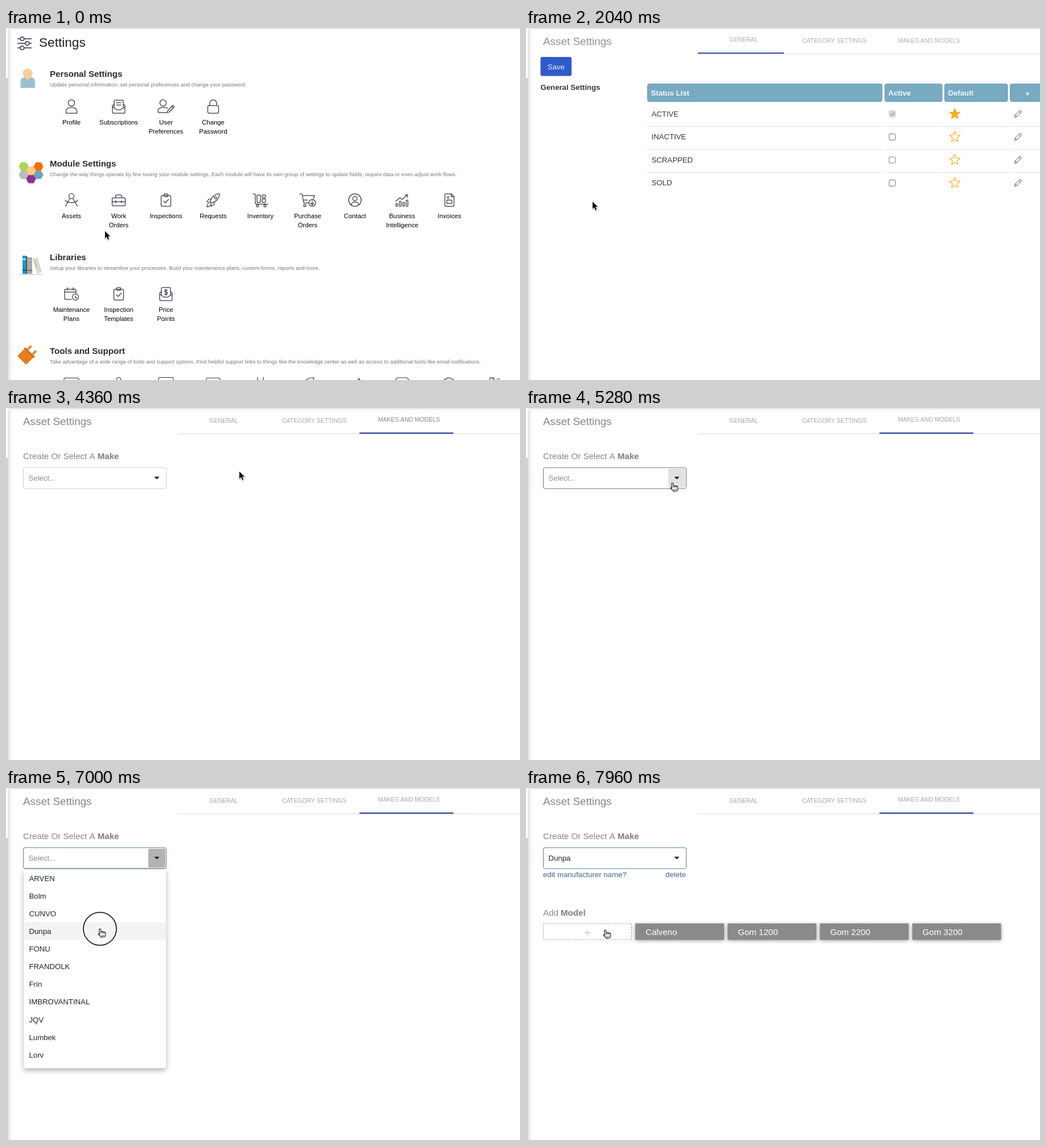
These frames come from a looping animation (903x620 px, 8000 ms). An HTML page with a canvas:

```html
<!DOCTYPE html>
<html lang="en">
<head>
<meta charset="utf-8">
<title>Asset settings</title>
<style>
html, body { margin: 0; width: 100%; height: 100%; overflow: hidden; background: #fff; }
canvas { display: block; }
</style>
</head>
<body>
<canvas id="stage" width="903" height="620"></canvas>
<script>
const W = 903, H = 620, LOOP = 8000, TICK = 40;
const ctx = document.getElementById('stage').getContext('2d');
const FONT = '"Liberation Sans", Arial, sans-serif';
const UNIT = 0.943; // page zoom
const clamp = v => Math.max(0, Math.min(1, v));

// ---------- helpers ----------
function text(s, x, y, size, color, { bold = false, align = 'left' } = {}) {
  ctx.font = `${bold ? 'bold ' : ''}${size * UNIT}px ${FONT}`;
  ctx.textAlign = align;
  ctx.fillStyle = color;
  ctx.fillText(s, x, y);
  return ctx.measureText(s).width;
}
function rect(x, y, w, h, color) {
  ctx.fillStyle = color;
  ctx.fillRect(x, y, w, h);
}
function round(x, y, w, h, r, fill, stroke) {
  ctx.beginPath();
  ctx.roundRect(x, y, w, h, r);
  if (fill) { ctx.fillStyle = fill; ctx.fill(); }
  if (stroke) { ctx.strokeStyle = stroke; ctx.lineWidth = 1; ctx.stroke(); }
}
function shape(points, color) {
  ctx.beginPath();
  points.forEach(([x, y]) => ctx.lineTo(x, y));
  ctx.closePath();
  ctx.fillStyle = color;
  ctx.fill();
}
function disc(x, y, r, color) {
  ctx.beginPath();
  ctx.arc(x, y, r, 0, Math.PI * 2);
  ctx.fillStyle = color;
  ctx.fill();
}
function at(x, y, draw, angle = 0) {
  ctx.save();
  ctx.translate(x, y);
  ctx.rotate(angle);
  draw();
  ctx.restore();
}
function shadowed(blur, color, dy, draw) {
  ctx.save();
  Object.assign(ctx, { shadowBlur: blur, shadowColor: color, shadowOffsetY: dy });
  draw();
  ctx.restore();
}

// ---------- line icons ----------
const dot = (x, y, r) => `M${x - r} ${y}a${r} ${r} 0 1 0 ${2 * r} 0a${r} ${r} 0 1 0 ${-2 * r} 0`;
const box = (x, y, w, h, r = 2) => `M${x + r} ${y}h${w - 2 * r}a${r} ${r} 0 0 1 ${r} ${r}v${h - 2 * r}` +
  `a${r} ${r} 0 0 1 ${-r} ${r}h${2 * r - w}a${r} ${r} 0 0 1 ${-r} ${-r}v${2 * r - h}a${r} ${r} 0 0 1 ${r} ${-r}`;
const envelope = 'M-8-4l-3 3v11a2 2 0 0 0 2 2h18a2 2 0 0 0 2-2v-11l-3-3M-11 1l8 5h6l8-5M-8 2v-11a2 2 0 0 1 2-2h12a2 2 0 0 1 2 2v11';
const icons = {
  sliders: 'M-12-8h4M0-8h12M-12 0h13M9 0h3M-12 8h4M0 8h12' + dot(-4, -8, 3.3) + dot(5, 0, 3.3) + dot(-4, 8, 3.3),
  profile: dot(0, -6, 5.6) + 'M-9.5 12v-3a7 7 0 0 1 7-7h5a7 7 0 0 1 7 7v3z',
  subscriptions: envelope + 'M-4-6.5h8M-4-2.5h8',
  preferences: dot(-5, -6, 5.6) + 'M1 11h-13q-2 0-2-2c0-5 3-7 7-7h5q3 0 4.5 1.3M3 8l8-9q2-1.5 3 .2t-.6 3l-7.4 7.8-4 1zM10 0l3 3',
  lock: box(-9.5, -1.5, 19, 13.5, 2.5) + 'M-6-1.5v-4a6 6 0 0 1 12 0v4',
  assets: dot(0, -7, 4.5) + 'M-2.5-3l-8 14M2.5-3l8 14M-11 0q2 4.5 11 4.5t11-4.5',
  work: box(-11.5, -4, 23, 14) + 'M-5.5-4v-3q0-2 2-2h7q2 0 2 2v3M-11.5 3h23M-5 1v4M5 1v4',
  clipboard: box(-8.5, -8, 17, 19) + box(-3.5, -11, 7, 5, 1.5) + 'M-4 2l3 3 5.5-6',
  rocket: 'M-5 4c1-8 7-15 16-15c0 9-7 15-15 16zM-3-2l-5 .5-3 5 5 .5M2 3l-.5 5-5 3-.5-5M-8 6q-3 1-3 6 5 0 6-3' + dot(4, -4, 2),
  trolley: 'M-13-11h2q2 0 2 2v14q0 2 2 2h20' + box(-6, -9, 6, 13, 1) + box(3, -9, 6, 5, 1) + box(3, -2, 6, 6, 1) + dot(-5, 10, 2) + dot(8, 10, 2),
  cart: 'M-14-11h3q1 0 1.4 2l2.6 14h8M-9.5-8h21.5l-2 6M-8 0h8M8 1.5v7m-3-3l3 3 3-3' + dot(-5, 9.5, 2) + dot(8, 5, 6),
  contact: dot(0, 0, 11) + dot(0, -2.5, 3.8) + 'M-6.5 8.5q1-5 5-5h3q4 0 5 5',
  chart: 'M-11 2l7-6 4 3 9-8M5-9h4.5v4.5' + box(-11, 6, 3, 5, 1) + box(-5, 2, 3, 9, 1) + box(1, 4, 3, 7, 1) + box(7, 0, 3, 11, 1),
  invoice: 'M-6-11h9l5 5v15q0 2-2 2h-12q-2 0-2-2v-18q0-2 2-2M3-11v5h5M-4.5-6h4M-4.5-3h4' + box(-4.5, 0, 9, 6, 1),
  calendar: 'M0 10h-10q-2 0-2-2v-14q0-2 2-2h16q2 0 2 2v6M-12-3h20M-7-11v5M3-11v5M7 4v3.5h3' + dot(7, 6, 5.5),
  price: envelope + 'M2.500-6q-2-1.5-4-.5t0 2.7 3.5 1.5-.2 3-4-.5M0-8v10',
  pencil: 'M-6 6l1-4 7-7q1.500-1.500 3 0t0 3l-7 7zM1-4l3 3M-5 2l3 3'
};
for (const key in icons) icons[key] = new Path2D(icons[key]);
function icon(name, x, y, width = 1.25) {
  at(x, y, () => {
    ctx.strokeStyle = '#30343f';
    ctx.lineWidth = width;
    ctx.lineJoin = ctx.lineCap = 'round';
    ctx.stroke(icons[name]);
  });
}

// ---------- coloured section pictures ----------
function drawPerson() {
  round(25.5, 87, 25.5, 18.5, [7, 7, 1, 1], '#9bbfd3');
  shape([[33, 87], [43, 87], [38, 92]], '#f0cd9b');
  disc(38, 80, 8.7, '#f6d09a');
}
function drawHexagons() {
  const cells = [[31, 244, '#a4d65e'], [57, 244, '#ff6b08'], [31, 258.5, '#b9bbbe'],
    [57, 258.5, '#6ba3bc'], [44, 266, '#8d3091'], [44, 251.5, '#ffcb80']];
  for (const [x, y, color] of cells) {
    shape(Array.from({ length: 6 }, (_, i) =>
      [x + 8.7 * Math.cos(i * Math.PI / 3), y + 8.7 * Math.sin(i * Math.PI / 3)]), color);
  }
}
function drawBooks() {
  rect(23, 433.5, 42, 1.5, '#cfd5d8');
  rect(29, 401, 6, 32, '#1c96cf');
  rect(29, 406, 6, 3, '#9bd8ee');
  rect(29, 425, 6, 3, '#15618c');
  rect(35, 402, 2.5, 31, '#47545f');
  rect(38, 404, 8, 29, '#a3a8ad');
  rect(38, 408, 8, 2, '#d9b48a');
  rect(38, 426, 8, 2, '#6c747c');
  at(47, 406, () => {
    rect(0, 0, 4, 28, '#ddd5c6');
    rect(4.5, 1, 4, 26, '#d3d4d2');
    rect(1, 4, 2, 14, '#e3b184');
  }, -0.28);
}
function drawPlug() {
  at(36, 577, () => {
    round(-11, -8, 22, 20, 2, '#e67e22');
    rect(-12, -9, 24, 3, '#cf6d1c');
    rect(-8, -18, 4, 9, '#e08a3c');
    rect(4, -18, 4, 9, '#e08a3c');
  }, Math.PI / 4);
}

// ---------- pages ----------
const sections = [
  ['Personal Settings', 'Update personal information, set personal preferences and change your password.', 86,
    [['profile', 'Profile'], ['subscriptions', 'Subscriptions'], ['preferences', 'User', 'Preferences'], ['lock', 'Change', 'Password']]],
  ['Module Settings', 'Change the way things operate by fine tuning your module settings. Each module will have its own group of settings to update fields, require data or even adjust work flows.', 244,
    [['assets', 'Assets'], ['work', 'Work', 'Orders'], ['clipboard', 'Inspections'], ['rocket', 'Requests'], ['trolley', 'Inventory'],
      ['cart', 'Purchase', 'Orders'], ['contact', 'Contact'], ['chart', 'Business', 'Intelligence'], ['invoice', 'Invoices']]],
  ['Libraries', 'Setup your libraries to streamline your processes. Build your maintenance plans, custom forms, reports and more.', 409,
    [['calendar', 'Maintenance', 'Plans'], ['clipboard', 'Inspection', 'Templates'], ['price', 'Price', 'Points']]],
  ['Tools and Support', 'Take advantage of a wide range of tools and support options. Find helpful support links to things like the knowledge center as well as access to additional tools like email notifications.', 574, []]
];
const cutIcons = new Path2D(box(102, 616.5, 26, 12) + dot(198, 619, 3.5) + box(268, 615.5, 26, 12) + box(352, 616.5, 24, 12) +
  'M442 615v6M452 615v6M527 620q5-4 14-4l-1 5M620 616v5M617.5 619h5M684 621q2-5 5-5h14q3 0 5 5M769 621q8-8 16-2l3 2M850 621v-5h9M853 616l7 5M862 618h6');

function drawShell() {
  rect(0, 0, W, H, '#fff');
  let g = ctx.createLinearGradient(0, 0, 0, 5);
  g.addColorStop(0, '#dededf');
  g.addColorStop(0.4, '#f3f3f3');
  g.addColorStop(1, '#fff');
  rect(4, 0, W, 5, g);
  g = ctx.createLinearGradient(3, 0, 13, 0);
  g.addColorStop(0, '#dfdfe0');
  g.addColorStop(0.4, '#f2f2f2');
  g.addColorStop(1, '#fff');
  rect(3, 3, 10, H, g);
  rect(0, 88, 4, H, '#d2d2d5');
}
function drawSettings() {
  icon('sliders', 32.5, 27, 1.5);
  text('Settings', 58, 33, 24, '#1d2026');
  drawPerson();
  drawHexagons();
  drawBooks();
  drawPlug();
  for (const [title, note, y, items] of sections) {
    const gap = y > 200 ? 7 : 0;
    text(title, 77, y, 16, '#252b35', { bold: true });
    text(note, 77, y + 17, 10, '#77777d');
    items.forEach(([name, ...lines], i) => {
      const x = 115 + 83 * i;
      icon(name, x, y + 52 + gap);
      lines.forEach((line, j) => text(line, x, y + 84 + gap + 16 * j, 12, '#000', { align: 'center' }));
    });
  }
  ctx.strokeStyle = '#30343f';
  ctx.lineWidth = 1.2;
  ctx.stroke(cutIcons);
}

const tabs = [['GENERAL', 382.3, 302, 151], ['CATEGORY SETTINGS', 541.6, 453, 168], ['MAKES AND MODELS', 708, 621, 165]];
function drawHeader(active, slide, focused) {
  text('Asset Settings', 30, 29.5, 20, '#858585');
  rect(302, 45, W - 302, 1, '#dcdcdc');
  tabs.forEach(([label, x], i) => {
    const on = i === active;
    text(label, x, on ? 24.3 : 25.5, 11.15, on && focused ? '#858585' : '#a6a6a6', { align: 'center' });
  });
  const [from, to] = [tabs[0], tabs[2]];
  const mix = k => from[k] + (to[k] - from[k]) * slide;
  rect(mix(2), 43, mix(3), 2.5, '#4354ad');
}

function star(x, y, filled) {
  ctx.beginPath();
  for (let i = 0; i < 10; i++) {
    const a = -Math.PI / 2 + i * Math.PI / 5, r = i % 2 ? 4.3 : 9.8;
    ctx.lineTo(x + r * Math.cos(a), y + 0.5 + r * Math.sin(a));
  }
  ctx.closePath();
  ctx.lineJoin = 'round';
  ctx.lineWidth = 1.2;
  ctx.strokeStyle = ctx.fillStyle = '#fca311';
  if (filled) ctx.fill();
  ctx.stroke();
}
function drawGeneral() {
  round(25.5, 51, 54.5, 33.5, 3, '#1b4ac4');
  text('Save', 52.7, 73, 14, '#fff', { align: 'center' });
  text('General Settings', 25.5, 108.5, 14, '#222', { bold: true });
  const columns = [[213, 413, 'Status List'], [630, 101.5, 'Active'], [735, 111.5, 'Default'], [850, 70, '']];
  for (const [x, w, label] of columns) {
    round(x + 0.5, 98.5, w - 1, 31, 3, '#6ba2bb', '#5d94ad');
    text(label, x + 6.5, 119, 14, '#fff', { bold: true });
    for (let i = 0; i < 3; i++) rect(x, 173 + 40.5 * i, w, 1, '#dcdcdc');
  }
  text('+', 881, 119.5, 14, '#fff', { bold: true, align: 'center' });
  ['ACTIVE', 'INACTIVE', 'SCRAPPED', 'SOLD'].forEach((label, i) => {
    const y = 151 + 40.5 * i;
    text(label, 220.5, y + 4.7, 14, '#212121');
    round(638, y - 5, 11, 11, 2, i ? '#fff' : '#d6d6d6', i ? '#666' : '#c4c4c4');
    if (!i) {
      ctx.strokeStyle = '#8e8e8e';
      ctx.lineWidth = 1.5;
      ctx.stroke(new Path2D('M640.5 151.5l2.5 2.5 4-5.5'));
    }
    star(753.3, y, !i);
    icon('pencil', 864.5, y, 0.9);
  });
}

const makes = ['ARVEN', 'Bolm', 'CUNVO', 'Dunpa', 'FONU', 'FRANDOLK', 'Frin', 'IMBROVANTINAL', 'JQV', 'Lumbek', 'Lorv'];
const models = ['Calveno', 'Gom 1200', 'Gom 2200', 'Gom 3200'];
const ROW = 31.1, LIST_TOP = 143;

function drawSelect({ value, focus, button }) {
  const w = text('Create Or Select A ', 30, 90, 16, '#858585');
  text('Make', 30 + w, 90, 16, '#7d7d7d', { bold: true });
  round(30.5, 105, 251, 37, 3, '#fff', focus ? '#527c9e' : '#d0d0d0');
  if (button) round(250, 107, 30, 33, 2, button);
  text(value || 'Select...', 39.5, 128, 14, value ? '#222' : '#8b8b8b');
  shape([[260.5, 121], [269.5, 121], [265, 125.7]], '#222');
}
function drawList(hover) {
  shadowed(10, 'rgba(0,0,0,.3)', 4, () => round(31, 142.5, 250, 351, [0, 0, 4, 4], '#fff'));
  rect(33, 141.5, 246, 1, '#527c9e');
  if (hover >= 0) rect(31.5, LIST_TOP + ROW * hover, 249, ROW, '#f3f3f3');
  makes.forEach((name, i) => text(name, 40.5, 163.7 + ROW * i, 14, '#222'));
}
function drawModels() {
  text('edit manufacturer name?', 30, 156.5, 14, '#3c6690');
  text('delete', 281, 156.5, 14, '#3c6690', { align: 'right' });
  const w = text('Add ', 30, 224.5, 16, '#858585');
  text('Model', 30 + w, 224.5, 16, '#7d7d7d', { bold: true });
  ctx.save();
  ctx.setLineDash([3, 2]);
  ctx.strokeStyle = '#a0a0a0';
  ctx.lineWidth = 1;
  ctx.strokeRect(30.5, 239, 155, 28);
  ctx.restore();
  rect(103, 254, 10, 1.2, '#bbb');
  rect(107.4, 249.5, 1.2, 10, '#bbb');
  models.forEach((name, i) => {
    const x = 192 + 162.2 * i;
    shadowed(7, 'rgba(0,0,0,.4)', 1, () => rect(x, 238.5, 156, 29, '#8a8a8a'));
    text(name, x + 18, 259, 16, '#fff');
  });
}

// ---------- pointer ----------
const ease = {
  in: u => u * u,
  out: u => 1 - (1 - u) ** 3,
  both: u => u * u * (3 - 2 * u),
  hold: () => 0
};
// time, x, y, easing towards the point
const route = [
  [0, 174, 358], [180, 174, 358, 'hold'], [440, 99, 299, 'both'], [600, 117, 306, 'both'],
  [2240, 117, 306, 'hold'], [2400, 747, 88, 'both'], [2480, 650, 80, 'both'],
  [2680, 650, 80, 'hold'], [3000, 724.5, 20, 'both'],
  [4080, 724.5, 20, 'hold'], [4360, 410, 112, 'in'], [4880, 257, 132, 'out'],
  [5760, 257, 132, 'hold'], [6600, 172, 234, 'both'], [6760, 165, 248, 'both'],
  [7880, 165, 248, 'hold'], [7960, 139, 250, 'both'], [LOOP, 139, 250, 'hold']
];
const arrow = new Path2D('M0 0v12.5l2.9-2.7 2.2 4.9 2.1-.9-2.1-4.8h4z');
const hand = new Path2D('M-1.5 9.5v-8a1.4 1.4 0 0 1 2.8 0v4.8a1.3 1.3 0 0 1 2.6.2a1.3 1.3 0 0 1 2.5.6a1.2 1.2 0 0 1 2.4.7v2.7q0 2.2-1.3 4.3h-6.8q-1-2-4.4-5.4a1.2 1.2 0 0 1 2.2-.9z');
const knuckles = new Path2D('M1.3 6v3M3.9 6.5v2.7M6.4 7v2.5M2 11v2.5M4 11v2.5M6 11v2.5');

function pointerAt(t) {
  const i = Math.max(1, route.findIndex(p => p[0] >= t));
  const [t0, x0, y0] = route[i - 1], [t1, x1, y1, kind] = route[i];
  const k = ease[kind](clamp((t - t0) / (t1 - t0)));
  return t === t1 ? [x1, y1] : [x0 + (x1 - x0) * k, y0 + (y1 - y0) * k];
}
function drawPointer(x, y, isHand) {
  at(x, y, () => {
    ctx.lineJoin = 'round';
    if (isHand) {
      ctx.rotate(-0.1);
      ctx.fillStyle = '#fff';
      ctx.strokeStyle = '#111';
      ctx.lineWidth = 1.1;
      ctx.fill(hand);
      ctx.stroke(hand);
      ctx.lineWidth = 0.7;
      ctx.stroke(knuckles);
    } else {
      shadowed(2, 'rgba(0,0,0,.35)', 1, () => {
        ctx.strokeStyle = '#fff';
        ctx.lineWidth = 1.8;
        ctx.stroke(arrow);
      });
      ctx.fillStyle = '#000';
      ctx.fill(arrow);
    }
  });
}
function drawClick(t, x, y) {
  for (const start of [1200, 3320, 5000, 7000]) {
    const u = (t - start) / 200;
    if (u < 0 || u >= 1) continue;
    ctx.beginPath();
    ctx.arc(x, y, 29 * (1 - u), 0, Math.PI * 2);
    ctx.strokeStyle = '#000';
    ctx.lineWidth = 1.5;
    ctx.stroke();
  }
}

// ---------- timeline ----------
const OPEN_PAGE = 1680, SWITCH_TAB = 3600, OPEN_LIST = 5320, PICK = 7240;

function draw(t) {
  const [x, y] = pointerAt(t);
  drawShell();
  if (t < OPEN_PAGE) {
    drawSettings();
  } else if (t < SWITCH_TAB) {
    ctx.globalAlpha = clamp((t - OPEN_PAGE + TICK) / 440);
    drawHeader(0, 0, false);
    drawGeneral();
    ctx.globalAlpha = 1;
  } else {
    drawHeader(2, ease.both(clamp((t - SWITCH_TAB + TICK) / 400)), t < 5000);
    const listOpen = t >= OPEN_LIST && t < PICK;
    const overSelect = x < 281 && y > 105 && y < 142;
    drawSelect({
      value: t >= PICK && makes[3],
      focus: t >= 5000,
      button: listOpen ? '#b3b3b3' : overSelect && '#e1e1e1'
    });
    if (listOpen) drawList(y > LIST_TOP ? Math.floor((y - LIST_TOP) / ROW) : -1);
    if (t >= PICK) {
      ctx.globalAlpha = clamp((t - PICK + TICK) / 400);
      drawModels();
      ctx.globalAlpha = 1;
    }
  }
  const overTab = t > 2480 && t < 4300 && y < 45 && x > 621;
  const overField = t > 4360 && x < 281;
  drawPointer(x, y, overTab || overField);
  drawClick(t, x, y);
}
function frame(now) {
  draw(Math.floor(now % LOOP / TICK) * TICK);
  requestAnimationFrame(frame);
}
draw(0);
requestAnimationFrame(frame);
</script>
</body>
</html>
```
